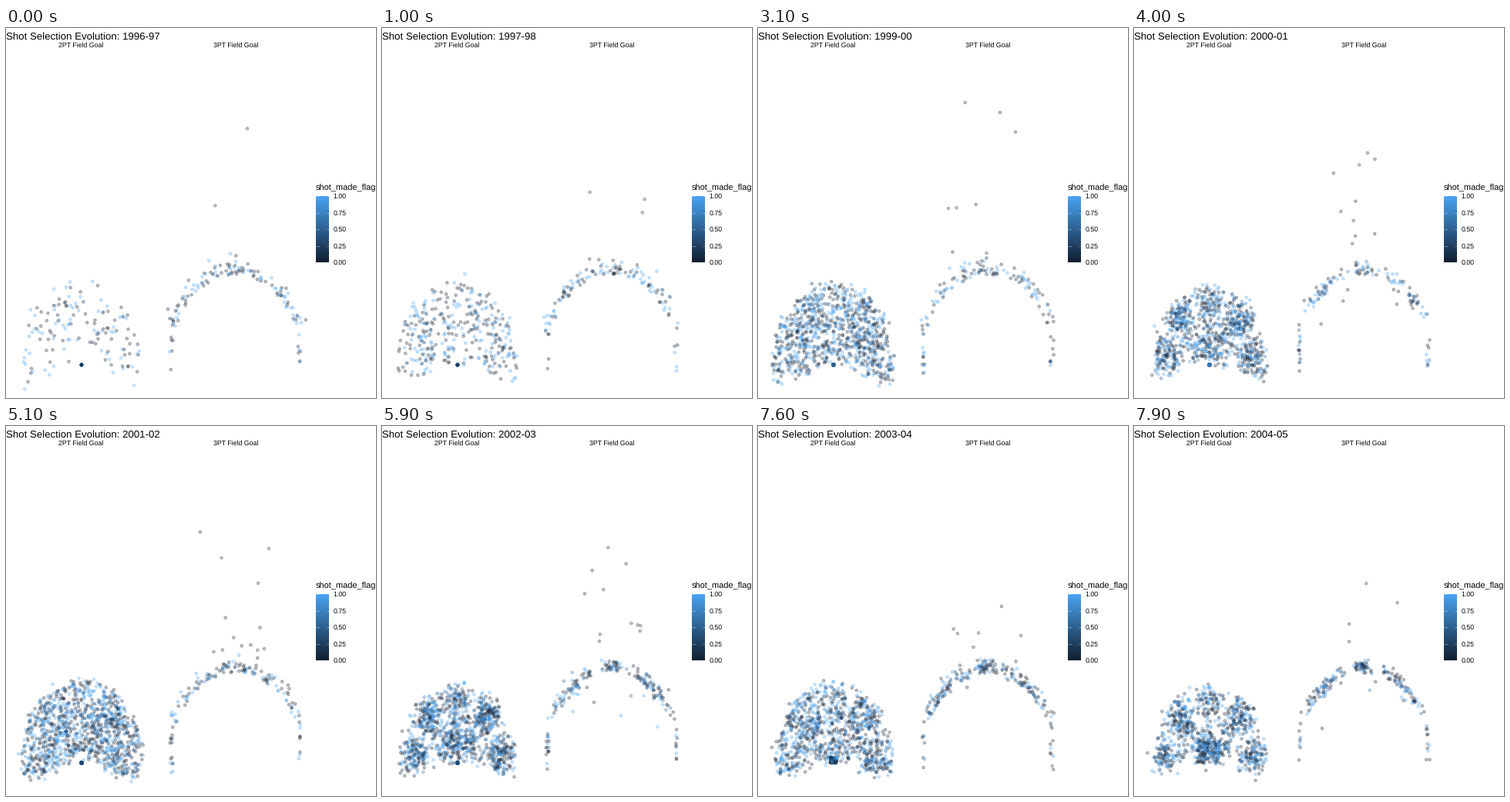
A matplotlib script that plays this animation: 480x480 px, repeating every 8 s.

```python
import numpy as np
import matplotlib.pyplot as plt
from matplotlib.animation import FuncAnimation
from matplotlib.colors import to_rgb

SIZE, DPI = 480, 72
FRAMES, INTERVAL = 80, 100
SEASONS = [f"{y}-{(y + 1) % 100:02d}" for y in range(1996, 2005)]
# First and last changing frame of each move to the next season.
MOVES = [(6, 10), (16, 23), (26, 31), (36, 43),
         (46, 51), (56, 62), (66, 72), (76, 82)]
COUNT_2PT = [165, 400, 410, 1120, 1150, 1350, 1400, 1250, 850]
COUNT_3PT = [136, 130, 75, 135, 150, 150, 250, 240, 190]
# Long attempts peak in the middle seasons.
COUNT_LONG = [round(2 + 11 * np.exp(-((s - 4.8) / 2.2) ** 2))
              for s in range(len(SEASONS))]
LAST = len(SEASONS) - 1
SHUFFLED = 7  # season in which many shots change zone

DARK, LIGHT = np.array(to_rgb("#111E31")), np.array(to_rgb("#4AA3F2"))
ALPHA = .3
HOOP_2PT, HOOP_3PT = (98, 437), (298, 437)
SCALE = np.array([.364, -.5])  # pixels per court unit

# Sides of the court run from -2 (left corner) to 2 (right corner).
SIDES = [-2, -1, 0, 1, 2]
RIM, PAINT = 3, 4
rng = np.random.default_rng(24)


def polar(degrees, r):
    a = np.radians(degrees)
    return np.column_stack([r * np.cos(a), r * np.sin(a)])


def shots_2pt(zone, season):
    u, v = rng.random((2, len(zone)))
    rim, paint = zone == RIM, zone == PAINT
    angle = np.where(paint, 180 * u, 90 - 41 * (zone + u - .5))
    spots = polar(angle, np.where(paint, 30 + 95 * v, 85 + 130 * v ** .75))
    spots += rng.normal(0, 8, spots.shape)
    # Shots at the rim spread over the paint in the last season.
    reach = float(season == LAST)
    spots[rim] = reach * np.column_stack([160 * u - 80, 105 * v - 5])[rim]
    return spots


def shots_3pt(zone, season):
    u, v = rng.random((2, len(zone)))
    side = np.sign(zone)
    angle = 90 - np.where(side == 0, 20 * u - 10, side * (10 + 55 * u))
    arc = polar(angle, 234 + np.abs(rng.normal(0, 19, len(zone))))
    corner = np.column_stack([side * (222 + 14 * v), 140 * u - 30])
    return np.where((np.abs(zone) == 2)[:, None], corner, arc)


def shots_long(zone, season):
    u, v = rng.random((2, len(zone)))
    return np.column_stack([300 * u - 150, 285 + 400 * v ** 1.8])


def build(counts, zones, odds, shots, hoop):
    """Positions and made flags of every row in each season."""
    n = max(counts)
    zone = rng.choice(zones, n, p=odds)
    made = rng.random(n) < np.where(zone == RIM, .62, .42)
    spots, flags = [], []
    for season in range(len(SEASONS)):
        moved = rng.random(n) < (.45 if season == SHUFFLED else .07)
        zone = np.where(moved, rng.choice(zones, n, p=odds), zone)
        made = made ^ (rng.random(n) < .12)
        spots.append(hoop + shots(zone, season) * SCALE)
        flags.append(made.astype(float))
    return np.array(spots), np.array(flags), counts


LAYERS = [
    build(COUNT_2PT, SIDES + [RIM, PAINT],
          [.13, .16, .11, .16, .13, .15, .16], shots_2pt, HOOP_2PT),
    build(COUNT_3PT, SIDES, [.06, .34, .2, .34, .06], shots_3pt, HOOP_3PT),
    build(COUNT_LONG, [0], [1], shots_long, HOOP_3PT),
]
LAYERS[-1][1][:] *= .1  # long attempts hardly ever go in

plt.rcParams["font.family"] = "Liberation Sans"
plt.rcParams["text.hinting"] = "none"
fig = plt.figure(figsize=(SIZE / DPI, SIZE / DPI), dpi=DPI, facecolor="white")
ax = fig.add_axes([0, 0, 1, 1])
ax.axis("off")


def label(x, y, text, size, **kw):
    return ax.text(x, y, text, fontsize=size, color="black", **kw)


title = label(0, 15, "", 13.2)
label(97.5, 25, "2PT Field Goal", 8.8, ha="center")
label(298.5, 25, "3PT Field Goal", 8.8, ha="center")
label(402, 211, "shot_made_flag", 11)

ramp = np.linspace(0, 1, 100)[:, None, None]
ax.imshow(LIGHT + (DARK - LIGHT) * ramp, extent=(402, 419, 304, 218),
          aspect="auto", interpolation="bilinear")
for value in np.linspace(0, 1, 5):
    y = 304 - 86 * value
    label(424.5, y + 3.1, f"{value:.2f}", 8.8)
    for x in (402, 415.5):
        ax.plot([x, x + 3.5], [y, y], color="white", lw=.5, alpha=.7)
ax.set_xlim(0, SIZE)
ax.set_ylim(SIZE, 0)

dots = ax.scatter([], [], s=3.9 ** 2, linewidths=.71, zorder=3)


def season_at(frame):
    """Index of the season being left and the share of the move done."""
    for i, (first, last) in enumerate(MOVES):
        if frame < first:
            return i, 0.0
        if frame < last:
            return i, (frame - first + 1) / (last - first + 1)
    return LAST, 0.0


def draw(frame):
    i, t = season_at(frame)
    j = min(i + 1, LAST)
    xy, made = [], []
    for spots, flags, counts in LAYERS:
        n = round(counts[i] + (counts[j] - counts[i]) * t)
        xy.append(spots[i, :n] * (1 - t) + spots[j, :n] * t)
        made.append(flags[i, :n] * (1 - t) + flags[j, :n] * t)
    made = np.concatenate(made)[:, None]
    rgba = np.column_stack([DARK + (LIGHT - DARK) * made,
                            np.full(len(made), ALPHA)])
    dots.set_offsets(np.concatenate(xy))
    dots.set_facecolor(rgba)
    dots.set_edgecolor(rgba)
    title.set_text(f"Shot Selection Evolution: {SEASONS[j if t >= .5 else i]}")
    return dots, title


anim = FuncAnimation(fig, draw, frames=FRAMES, interval=INTERVAL,
                     repeat=True, repeat_delay=0)
plt.show()
```
